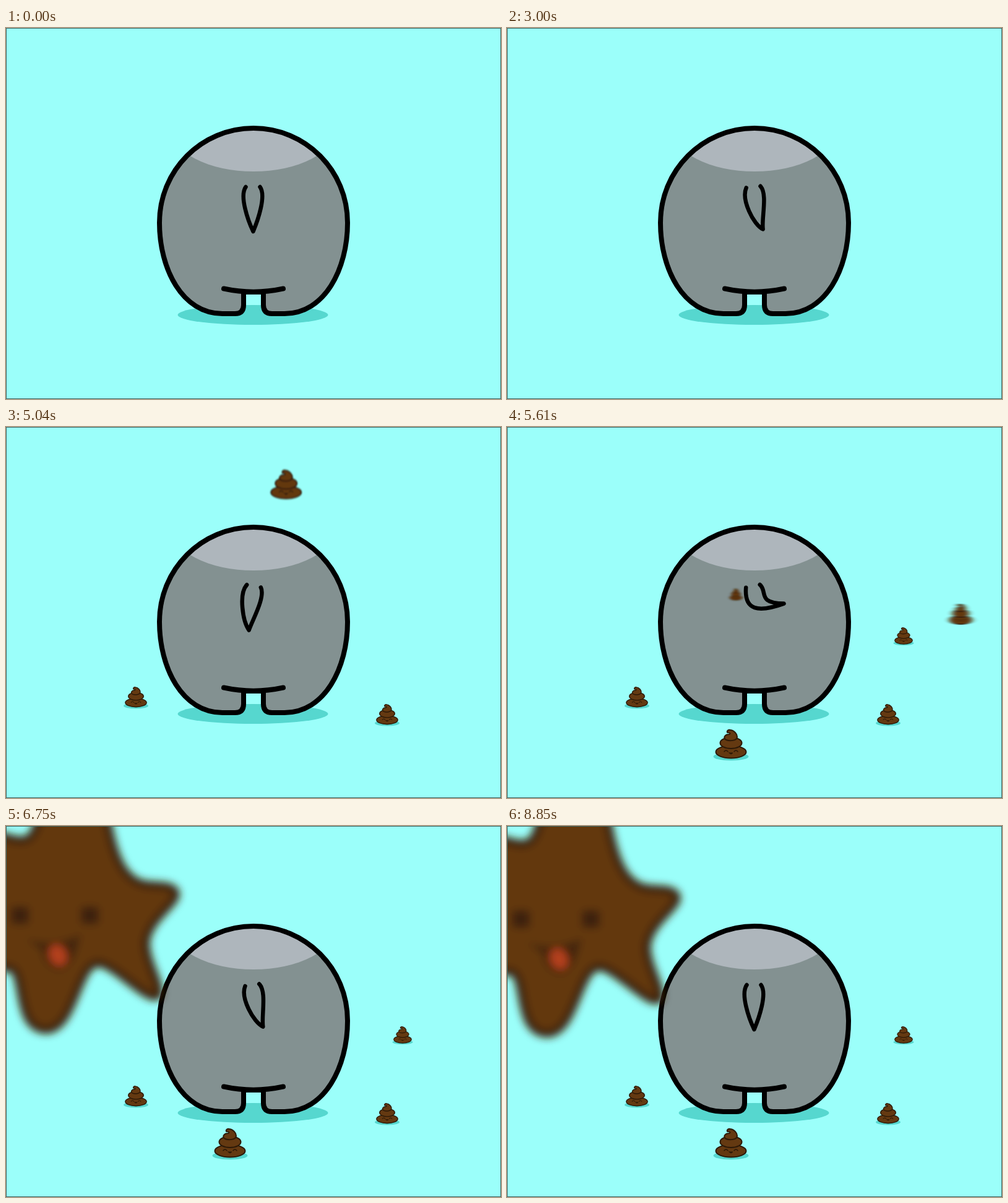
Animation of 800 by 600 pixels, one loop 8910 ms. Source, as an HTML page:

```html
<!DOCTYPE html>
<html lang="en">
<head>
<meta charset="utf-8">
<title>Hippo</title>
<style>
html, body { margin: 0; width: 100%; height: 100%; overflow: hidden; background: #9bfffa; }
svg { display: block; width: 100vw; height: 100vh; }
.line { fill: none; stroke: #000; stroke-linecap: round; stroke-linejoin: round; }
</style>
</head>
<body>
<svg viewBox="0 0 800 600">
  <defs>
    <path id="body" d="M400 162C484 162 552 230 552 315C552 390 515 462 450 462H430Q416 462 416 448V427H384V448Q384 462 370 462H350C285 462 248 390 248 315C248 230 316 162 400 162Z"/>
    <clipPath id="inside"><use href="#body"/></clipPath>
    <filter id="soft" filterUnits="userSpaceOnUse" x="-100" y="-300" width="500" height="800">
      <feGaussianBlur stdDeviation="6.5"/>
    </filter>
    <g id="poop" fill="#643911" stroke="#2c1907" stroke-width="2" stroke-linejoin="round" stroke-linecap="round">
      <ellipse cy="12.500" rx="24.500" ry="10"/>
      <ellipse cy="-2" rx="17.500" ry="9"/>
      <path d="M-8 -7C-14 -11 -9 -16 -3 -16C0 -17 -2 -19 -6 -19C-7 -22 -4 -24 -1 -23C6 -22 10 -16 10 -12C10 -5 -3 -5 -8 -7Z"/>
      <path fill="none" stroke-width="1.500" d="M-11 12Q-8 8 -5 12M5 12Q8 8 11 12"/>
      <path fill="#2c1907" stroke-width="1" d="M-3 14H3Q0 18 -3 14Z"/>
    </g>
  </defs>
  <rect width="800" height="600" fill="#9bfffa"/>
  <ellipse cx="399" cy="464" rx="121.5" ry="16" fill="#56d7cf"/>
  <use href="#body" fill="#839191"/>
  <ellipse cx="400" cy="162" rx="133" ry="70" fill="#aeb6bc" clip-path="url(#inside)"/>
  <use href="#body" class="line" stroke-width="8"/>
  <path class="line" stroke-width="8" d="M352 421.500Q400 432 448 421.500"/>
  <path id="tail" class="line" stroke-width="6.5"/>
  <g id="poops"></g>
  <g id="splat" filter="url(#soft)">
    <path fill="#643911" stroke="#3a2008" stroke-width="13" stroke-linejoin="round" d="M-60 12C-20 12 0 29 25 29C48 29 52 0 62 -50L152 -60C167 0 170 94 228 101C250 103 264 101 273 111C284 128 232 152 226 194C226 228 254 266 245 281C230 292 176 230 150 228C115 226 112 334 65 336C14 334 32 245 8 236L-60 230Z"/>
    <rect x="8" y="136" width="29" height="29" rx="3" fill="#3c240d"/>
    <rect x="121" y="136" width="29" height="29" rx="3" fill="#3c240d"/>
    <path fill="#44260b" d="M32 188Q76 203 121 181Q110 237 86 240Q60 234 58 208Z"/>
    <ellipse cx="84" cy="215" rx="14" ry="18" fill="#b3411b" transform="rotate(-25 84 215)"/>
  </g>
  <rect x=".5" y=".5" width="799" height="599" fill="none" stroke="#3d6664"/>
</svg>
<script>
const LOOP = 8910, STEP = 30, TAU = Math.PI * 2;
const LAUNCH = [400, 283], SPLAT = 5910;
const CALM = 6270; // the swing slows and fades from here
const NS = 'http://www.w3.org/2000/svg';
const $ = id => document.getElementById(id);
const mix = (a, b, k) => a + (b - a) * k;
const clamp = k => Math.max(0, Math.min(1, k));

// size is reached quickly unless grow is low; via bends the flight
const FLIGHTS = [
  { start: 3300, time: 210, to: [616, 465], size: .7, lands: true },
  { start: 4200, time: 270, to: [210, 437], size: .7, lands: true },
  { start: 4320, time: 990, to: [362, 513], size: 1, lands: true, via: [[815, 310], [400, -370]] },
  { start: 5310, time: 210, to: [641, 338], size: .58, lands: true },
  { start: 5430, time: 243, to: [850, 310], size: .72 },
  { start: 5580, time: 330, to: [70, 150], size: 4.5, grow: 1 }
];

function add(tag, parent, attrs) {
  const el = document.createElementNS(NS, tag);
  for (const k in attrs) el.setAttribute(k, attrs[k]);
  return parent.appendChild(el);
}
const show = (el, on) => el.setAttribute('display', on ? 'inline' : 'none');

FLIGHTS.forEach((f, i) => {
  const [x, y] = f.to, s = f.size;
  const filter = add('filter', $('poops'), {
    id: 'speed' + i, filterUnits: 'userSpaceOnUse', x: -200, y: -200, width: 1200, height: 1000
  });
  f.blur = add('feGaussianBlur', filter, { stdDeviation: 0 });
  f.shadow = add('ellipse', $('poops'), { cx: x, cy: y + 20 * s, rx: 28.5 * s, ry: 6.5 * s, fill: '#56d7cf' });
  f.g = add('g', $('poops'), {});
  f.poop = add('use', f.g, { href: '#poop' });
});

function place(f, k) {
  return f.to.map((end, c) => {
    const a = LAUNCH[c];
    if (!f.via) return mix(a, end, k);
    const j = 1 - k;
    return j ** 3 * a + 3 * j * j * k * f.via[0][c] + 3 * j * k * k * f.via[1][c] + k ** 3 * end;
  });
}

function drawFlight(f, t, i) {
  const k = clamp((t - f.start) / f.time), done = k === 1;
  show(f.shadow, f.lands && done);
  show(f.g, k > 0 && (f.lands || !done));
  const [x, y] = place(f, k), [px, py] = place(f, k - 1 / f.time);
  const s = f.size * Math.min(1, (f.grow || 6) * k);
  f.poop.setAttribute('transform', `translate(${x} ${y}) scale(${s})`);
  f.blur.setAttribute('stdDeviation', `${Math.abs(x - px) * 2.5} ${Math.abs(y - py) * 2.5}`);
  f.g.setAttribute('filter', done ? 'none' : `url(#speed${i})`);
}

// Swing grows, holds, then dies away
function swingAt(t) {
  const fast = t < CALM;
  const power = fast ? clamp((t - 1710) / 1830) ** 3 : Math.exp((CALM - t) / 433);
  return t > 8190 ? 0 : power * Math.cos(TAU * (t - CALM) / (fast ? 330 : 480));
}

function tailPath(t) {
  const q = swingAt(t);
  const twist = -q * (.8 + .6 * Math.cos(TAU * (t - CALM) / 1380));
  const sag = twist * twist, sin = Math.sin(twist), cos = Math.cos(twist);
  const rx = 399 + 2.2 * sag + 8 * sin, ry = 265 + 3.5 * sag - 8 * cos;
  // Frame of the root: u across it, v down the tail
  const at = (u, v) => [rx + u * cos - v * sin, ry + u * sin + v * cos];
  const tip = [399.5 + 48 * q, 329 - 44 * q * q + 14 * sag];
  const dx = tip[0] - rx, dy = tip[1] - ry;
  const across = dx * cos + dy * sin, down = dy * cos - dx * sin;
  const bend = at(0, down * (.75 + .2 * clamp(Math.abs(across) / 25)));
  const ex = tip[0] - bend[0], ey = tip[1] - bend[1], e = Math.hypot(ex, ey) / 8;
  const side = s => [
    at(11.5 * s, 0),
    at(22 * s, 14 + Math.max(0, -s * across) / 2),
    [bend[0] + s * ey / e, bend[1] - s * ex / e]
  ];
  const l = side(-1), r = side(1).reverse();
  return `M${l[0]}C${l[1]} ${l[2]} ${tip}C${r.join(' ')}`;
}

function draw(t) {
  $('tail').setAttribute('d', tailPath(t));
  FLIGHTS.forEach((f, i) => drawFlight(f, t, i));
  const slide = -73 * Math.exp((6270 - Math.max(t, 6180)) / 192);
  show($('splat'), t >= SPLAT);
  $('splat').setAttribute('transform', `translate(0 ${slide})`);
}

const begin = performance.now();
function tick() {
  const t = (performance.now() - begin) % LOOP;
  draw(Math.floor(t / STEP) * STEP);
  requestAnimationFrame(tick);
}
tick();
</script>
</body>
</html>
```
